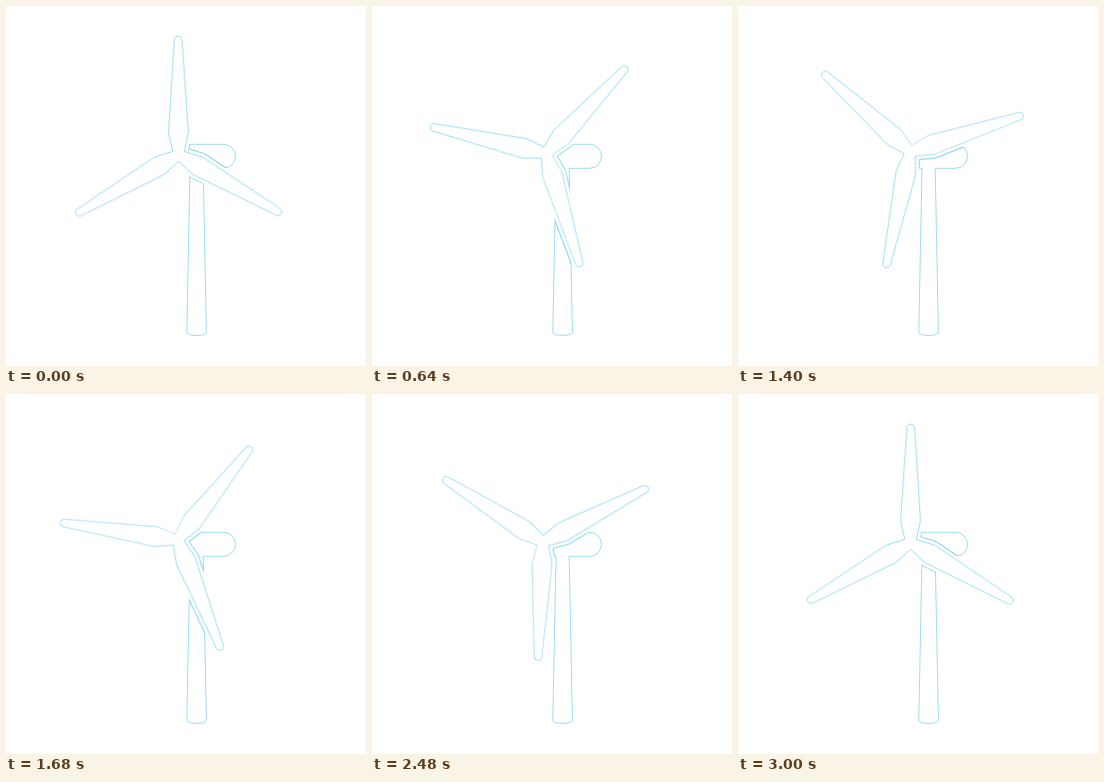
Animation of 360 by 360 pixels, one loop 3.04 s. Source, as an HTML page:

```html
<!DOCTYPE html>
<html lang="en">
<head>
<meta charset="utf-8">
<title>Wind turbine</title>
<style>
  html, body { margin: 0; width: 100%; height: 100%; overflow: hidden; background: #fff; }
  svg { display: block; width: 100vw; height: 100vh; }
  .line { fill: #fff; stroke: #22b4e2; stroke-width: .45; }
  .gap-edge { fill: none; stroke: #22b4e2; stroke-width: 8.05; }
  .gap { fill: #fff; stroke: #fff; stroke-width: 7.15; }
  .spin {
    transform-origin: 172.3px 147.2px;
    animation: spin 3040ms steps(76) infinite;
  }
  /* 76 steps of about 4.8 degrees: the last pose nearly equals the first */
  @keyframes spin {
    from { transform: rotate(-.2deg); }
    to { transform: rotate(-364.6deg); }
  }
</style>
</head>
<body>
<svg viewBox="0 0 360 360">
  <defs>
    <path id="mast" d="M184 162.3 L180.8 326 Q181 329.4 190.5 329.4 Q200 329.4 200.4 326
      L197.2 162.3 H217.5 A12 12 0 0 0 217.5 138.3 H171 V156.5 Q174 162.3 180 162.3 Z"/>
    <path id="rotor" transform="translate(172.5 148.7)"/>
    <clipPath id="inside"><use href="#mast"/></clipPath>
  </defs>
  <use href="#mast" class="line"/>
  <g clip-path="url(#inside)">
    <g class="spin"><use href="#rotor" class="gap-edge"/></g>
  </g>
  <g class="spin">
    <use href="#rotor" class="gap"/>
    <use href="#rotor" class="line"/>
  </g>
</svg>
<script>
  // One blade pointing up, from its left root to its right root.
  const blade = [
    ['L', [-5.7, -3.3]],
    ['L', [-9.6, -20.5]],
    ['Q', [-10, -22.5], [-9.8, -24.5]],
    ['L', [-3.8, -115]],
    ['C', [-3.6, -119.6], [3.6, -119.6], [3.8, -115]],
    ['L', [9.8, -24.5]],
    ['Q', [10, -22.5], [9.6, -20.5]]
  ];

  function turn([x, y], angle) {
    const c = Math.cos(angle), s = Math.sin(angle);
    return [x * c - y * s, x * s + y * c].map(v => v.toFixed(2)).join(' ');
  }

  const outline = [0, 1, 2].map(i =>
    blade.map(([cmd, ...points]) =>
      cmd + points.map(p => turn(p, i * Math.PI * 2 / 3)).join(' ')
    ).join('')
  ).join('');

  document.getElementById('rotor').setAttribute('d', 'M' + outline.slice(1) + 'Z');
</script>
</body>
</html>
```
